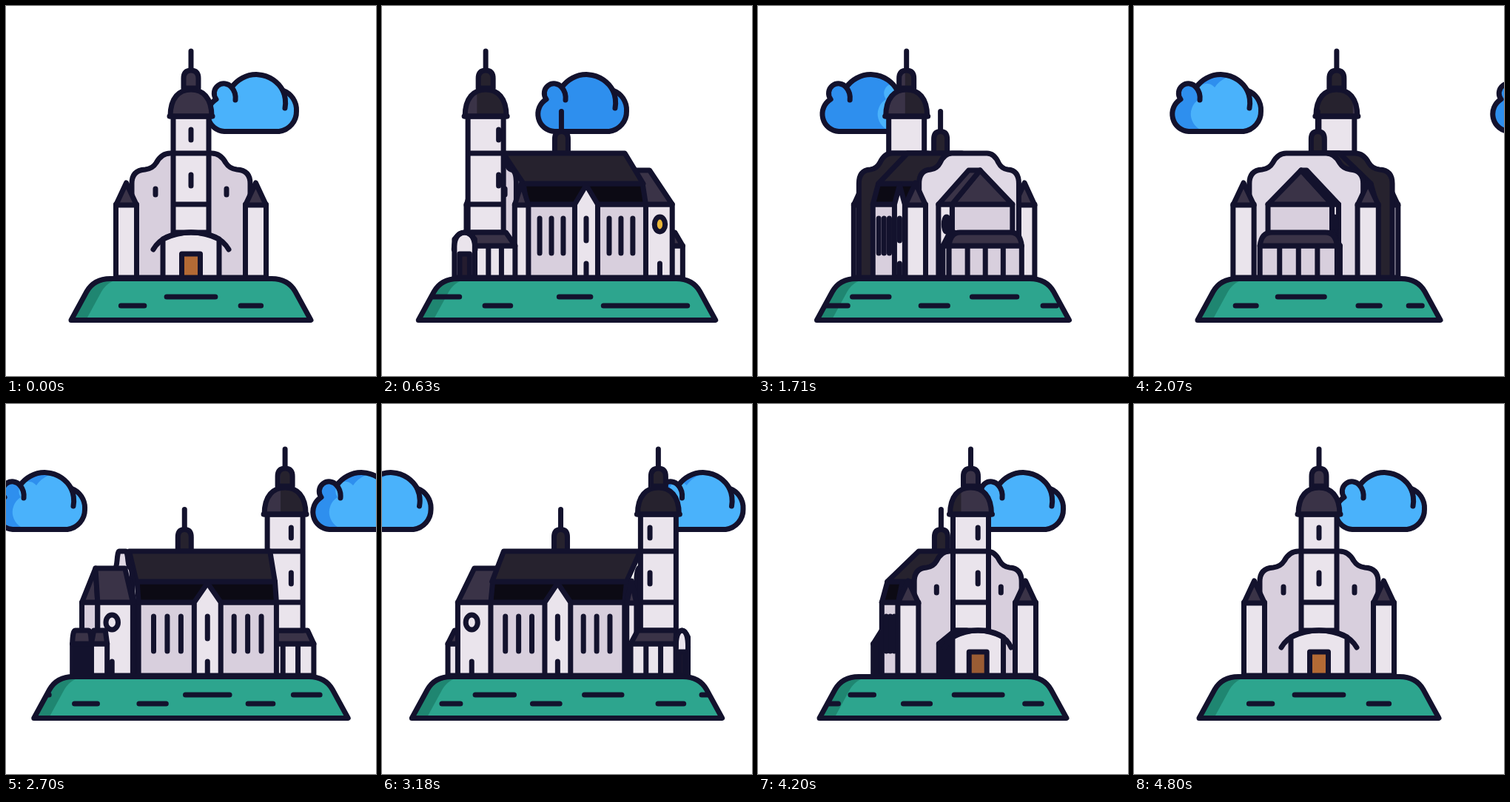
Animation, 500 px wide and 500 px high, one loop 6830 ms. Source, as an HTML page with a canvas:

```html
<!DOCTYPE html>
<html lang="en">
<head>
<meta charset="utf-8">
<title>Turning church</title>
<style>
html, body { margin: 0; width: 100%; height: 100%; overflow: hidden; background: #fff; }
canvas { display: block; width: 100vw; height: 100vh; }
</style>
</head>
<body>
<canvas id="stage" width="500" height="500"></canvas>
<script>
const g = document.getElementById('stage').getContext('2d');
const LOOP = 6830, SPIN = 4800, STEP = 30;
const INK = '#13122d', LIGHT = '#eae4ec', SHADE = '#d8cfdd', ROOF = '#3a3347',
  DARK = '#26222e', BLACK = '#0c0a14', GREEN = '#2da58e', MOSS = '#1f8671',
  SKY = '#4ab2fb', DEEP = '#2e8fee', GOLD = '#e9b536';

const TIMES = [0, 630, 1350, 2070, 2700, 3690, 4800];
const TURN = [0, 57, 126, 190.5, 256, 317, 360];
const CLOUD_A = [221, 159, 72, 0, -65, -145, -230];
const CLOUD_B = [650, 590, 505, 433, 363, 275, 221];
const CLOUD_SHADE = [0, 124, 124, 25, 22, 0, 0];

// Smooth curve through the keys, settling at the end
function ease(v, t) {
  const n = TIMES.length - 1;
  const sec = i => (v[i + 1] - v[i]) / (TIMES[i + 1] - TIMES[i]);
  const slope = i => i === 0 ? sec(0) : i === n ? 0 : (sec(i - 1) + sec(i)) / 2;
  let i = 0;
  while (i < n - 1 && t >= TIMES[i + 1]) i++;
  const h = TIMES[i + 1] - TIMES[i], u = (t - TIMES[i]) / h, w = 1 - u;
  return v[i] * (1 + 2 * u) * w * w + slope(i) * h * u * w * w +
    v[i + 1] * u * u * (3 - 2 * u) - slope(i + 1) * h * u * u * w;
}

let deg, s, c, c4, k;           // angle, sine, cosine, cosine^4, visible side
const rad = d => d * Math.PI / 180;
const wrap = d => ((d + 180) % 360 + 360) % 360 - 180;
const px = (x, z) => 250 + x * c - z * s;
// Walls narrow as they turn, the half facing away more so
const narrow = sx => sx === k ? 0.71 + 0.29 * c4 : 0.6 + 0.4 * c4;

function paint(path, fill) {
  if (fill) { g.fillStyle = fill; g.fill(path); }
  g.stroke(path);
}
function moved(d, scale, dx) {
  const p = new Path2D();
  p.addPath(new Path2D(d), { a: scale, b: 0, c: 0, d: 1, e: dx, f: 0 });
  return p;
}
const put = (d, dx, fill) => paint(moved(d, 1, dx), fill);
const front = (d, z, fill) => paint(moved(d, c, 250 - z * s), fill);
const side = (d, x, fill) => paint(moved(d, -s, 250 + x * c), fill);
const poly = (pts, fill) => paint(new Path2D('M' + pts.map(p => p.join(' ')).join('L') + 'Z'), fill);
const slope = (x1, za, zb, y1, x2, zc, zd, y2, fill) =>
  poly([[px(x1, za), y1], [px(x1, zb), y1], [px(x2, zd), y2], [px(x2, zc), y2]], fill);
const sideSeen = () => Math.abs(s) > 0.05;

const CLOUD = 'M74 169.5A23.5 23.5 0 0 1 63 126A13 13 0 0 1 84 110A40.5 40.5 0 0 1 153 114A28 28 0 0 1 171.5 142A27 27 0 0 1 148 169.5Z';
function cloud(dx, shade) {
  const body = moved(CLOUD, 1, dx);
  g.fillStyle = DEEP;
  g.fill(body);
  g.save();
  g.clip(body);
  g.fillStyle = SKY;
  g.fill(moved(CLOUD, 1, dx + shade));
  g.restore();
  g.stroke(body);
  put('M84 110Q90 117 89 127M153 114A40.5 40.5 0 0 1 156 138', dx);
}

const DOME = 'M-28 149C-28 124 -16 113 0 113C16 113 28 124 28 149Z';
const LANTERN = 'M-10 111V98Q-10 87 0 87Q10 87 10 98V111Z';
function tower() {
  const x = px(0, 131);
  put('M-24 149H24V306H-24ZM-24 199H24M-24 268H24', x, LIGHT);
  for (const a of [0, 90, 270]) {
    const d = wrap(a - deg);
    if (Math.abs(d) < 45) put('M0 167V181M0 228V243', x + 23 * Math.sin(rad(d * 1.5)));
  }
  put('M0 61V87', x);
  const caps = moved(DOME, 1, x);
  caps.addPath(moved(LANTERN, 1, x));
  g.fillStyle = DARK;
  g.fill(caps);
  g.save();
  g.clip(caps);
  g.fillStyle = ROOF;
  for (const [a, b] of [[-30, 45], [88, 156], [215, 250]]) {
    const mid = wrap((a + b) / 2 - deg), half = (b - a) / 2;
    const edge = d => 29 * Math.sin(rad(Math.max(-90, Math.min(90, d * 2))));
    const l = edge(mid - half), r = edge(mid + half);
    g.fillRect(x + l, 80, r - l, 72);
  }
  g.restore();
  g.stroke(caps);
  put('M-29 149H29', x);
}

const HALF_GABLE = 'M0 199H28Q40 199 47 212Q52 220 62 221Q80 222 80 240V367H0';
function bothHalves(d, z, fill) {
  const p = new Path2D();
  for (const sx of [-1, 1]) p.addPath(moved(d, sx * c * narrow(sx), 250 - z * s));
  paint(p, fill);
}
function frontWall() {
  if (c > 0) {
    bothHalves(HALF_GABLE, 120, SHADE);
    bothHalves('M48 247V255', 123);
  } else if (c < -0.8) bothHalves(HALF_GABLE, 120, DARK);
}
function backWall() {
  if (c < 0) bothHalves(HALF_GABLE, -96, '#e0d9e5');
}

function turret(sx, z) {
  const facing = z * c > 0;
  if (!facing && c > -0.8) return;
  const x = px(sx * 87.5 * narrow(sx) * (facing ? 1 : 0.85), z);
  const h = 14 * Math.abs(c) + 2 * Math.abs(s);
  poly([[x - h, 367], [x - h, 268], [x + h, 268], [x + h, 367]], LIGHT);
  poly([[x - h, 269], [x, 239], [x + h, 269]], ROOF);
}

function nave() {
  const mid = 250 - 9 * Math.abs(s);
  put('M0 142.5V170', mid);
  put('M-9 199V180Q-9 169.5 0 169.5Q9 169.5 9 180V199Z', mid, DARK);
  if (!sideSeen()) return;
  const x = 60 * k;
  side('M104 268H-88V367H104Z', x, SHADE);
  slope(52 * k, 104, -88, 240, x, 104, -88, 268, BLACK);
  slope(8 * k, 108, -88, 199, 52 * k, 104, -89, 240, DARK);
  for (const o of [37, 56, 75])
    side(`M${8 - o} 287V334M${8 + o} 287V334`, x);
  side('M-10.5 367V268L8 242L26.5 268V367Z', x, LIGHT);
  side('M8 287V317M8 348V367', x);
}

function choir() {
  if (c < 0) {
    front('M-44 268H44V367H-44Z', -141, SHADE);
    poly([[px(-44, -141), 268], [px(0, -133), 222], [px(44, -141), 268]], ROOF);
  }
  if (!sideSeen()) return;
  side('M-92 268H-141V367H-92Z', 44 * k, LIGHT);
  slope(0, -92, -133, 222, 44 * k, -92, -141, 268, ROOF);
  side('M-121 348V367', 44 * k);
  const oval = new Path2D();
  oval.ellipse(px(44 * k, -121), 295, 0.5 + 8 * Math.abs(s), 10, 0, 0, 7);
  paint(oval, k > 0 ? GOLD : LIGHT);
}

function apse() {
  if (sideSeen()) {
    side('M-130 324H-152V367H-130Z', 53 * k, LIGHT);
    slope(43 * k, -130, -146, 306, 53 * k, -130, -152, 324, ROOF);
  }
  if (c < 0) {
    front('M-53 324H53V367H-53ZM-26 324V367M0 324V367M26 324V367', -152, SHADE);
    front('M-53 324Q-51 306 -37 306H37Q51 306 53 324Z', -152, ROOF);
  }
}

function porch() {
  const w = 24 + 14 * c4, e = w + 13 * c4;
  if (sideSeen()) {
    side('M100 324H165V367H100ZM122 324V367M143 324V367', w * k, LIGHT);
    slope(w * 0.4 * k, 105, 160, 306, w * k, 100, 165, 324, ROOF);
  }
  if (c <= 0) return;
  const lit = (dark, full) => dark + (full - dark) * c4;
  const wood = `rgb(${lit(22, 179)}, ${lit(20, 106)}, ${lit(46, 53)})`;
  front(`M${-w} 367V315Q${-w / 2} 306 0 306Q${w / 2} 306 ${w} 315V367Z`, 165, LIGHT);
  front(`M${-e} 329Q${-w} 306 0 306Q${w} 306 ${e} 329`, 165);
  front('M-12.5 367V335H12.5V367Z', 165, wood);
}

// Height, angular start and end, and how far from the middle it stays in view
const DASHES = [
  [393, -11.5, 11.5], [393, 54, 66, 52], [393, 113, 133, 55], [393, 171, 193, 75],
  [393, 254, 270, 54], [393, 296, 310, 52],
  [405, 24, 35, 73], [405, 71, 110], [405, 148, 160], [405, 209, 220],
  [405, 237, 247], [405, 277, 287], [405, -35, -22.5]
];
function ground() {
  const hw = Math.hypot(165 * c, 218 * s), b = hw - 3;
  const d = `M${-b} 424.5L${-b + 21} 386Q${-b + 31} 368.5 ${-b + 53} 368.5H${b - 53}` +
    `Q${b - 31} 368.5 ${b - 21} 386L${b} 424.5Z`;
  const hill = moved(d, 1, 250);
  g.fillStyle = MOSS;
  g.fill(hill);
  g.save();
  g.clip(hill);
  g.fillStyle = GREEN;
  g.fill(moved(d, 1, 270));
  for (const [y, a1, a2, lim = 72] of DASHES) {
    const mid = wrap((a1 + a2) / 2 - deg), half = (a2 - a1) / 2;
    if (Math.abs(mid) > lim) continue;
    const at = a => 250 + hw * Math.sin(rad(Math.max(-90, Math.min(90, a))));
    put(`M${at(mid - half)} ${y}H${at(mid + half)}`, 0);
  }
  g.restore();
  g.stroke(hill);
}

// Position used for depth order, then the painter
const PARTS = [
  [0, 131, tower], [0, 150, porch], [0, 120, frontWall], [0, 8, nave],
  [0, -108, backWall], [0, -140, choir], [0, -148, apse]
];
for (const sx of [-1, 1])
  PARTS.push([sx * 5, 125, () => turret(sx, 115)], [sx * 5, -110, () => turret(sx, -100)]);

function draw(t) {
  deg = ease(TURN, t) % 360;
  s = Math.sin(rad(deg));
  c = Math.cos(rad(deg));
  c4 = c ** 4;
  k = s < 0 ? -1 : 1;
  g.fillStyle = '#fff';
  g.fillRect(0, 0, 500, 500);
  g.strokeStyle = INK;
  g.lineWidth = 7;
  g.lineJoin = g.lineCap = 'round';
  const shade = Math.max(0, Math.min(124, ease(CLOUD_SHADE, t)));
  cloud(ease(CLOUD_A, t), shade);
  cloud(ease(CLOUD_B, t), shade);
  PARTS.map(([x, z, f]) => [x * s + z * c, f])
    .sort((a, b) => a[0] - b[0])
    .forEach(p => p[1]());
  ground();
}

const begin = performance.now();
function tick() {
  const t = (performance.now() - begin) % LOOP;
  draw(Math.min(SPIN, Math.floor(t / STEP) * STEP));
  requestAnimationFrame(tick);
}
tick();
</script>
</body>
</html>
```
